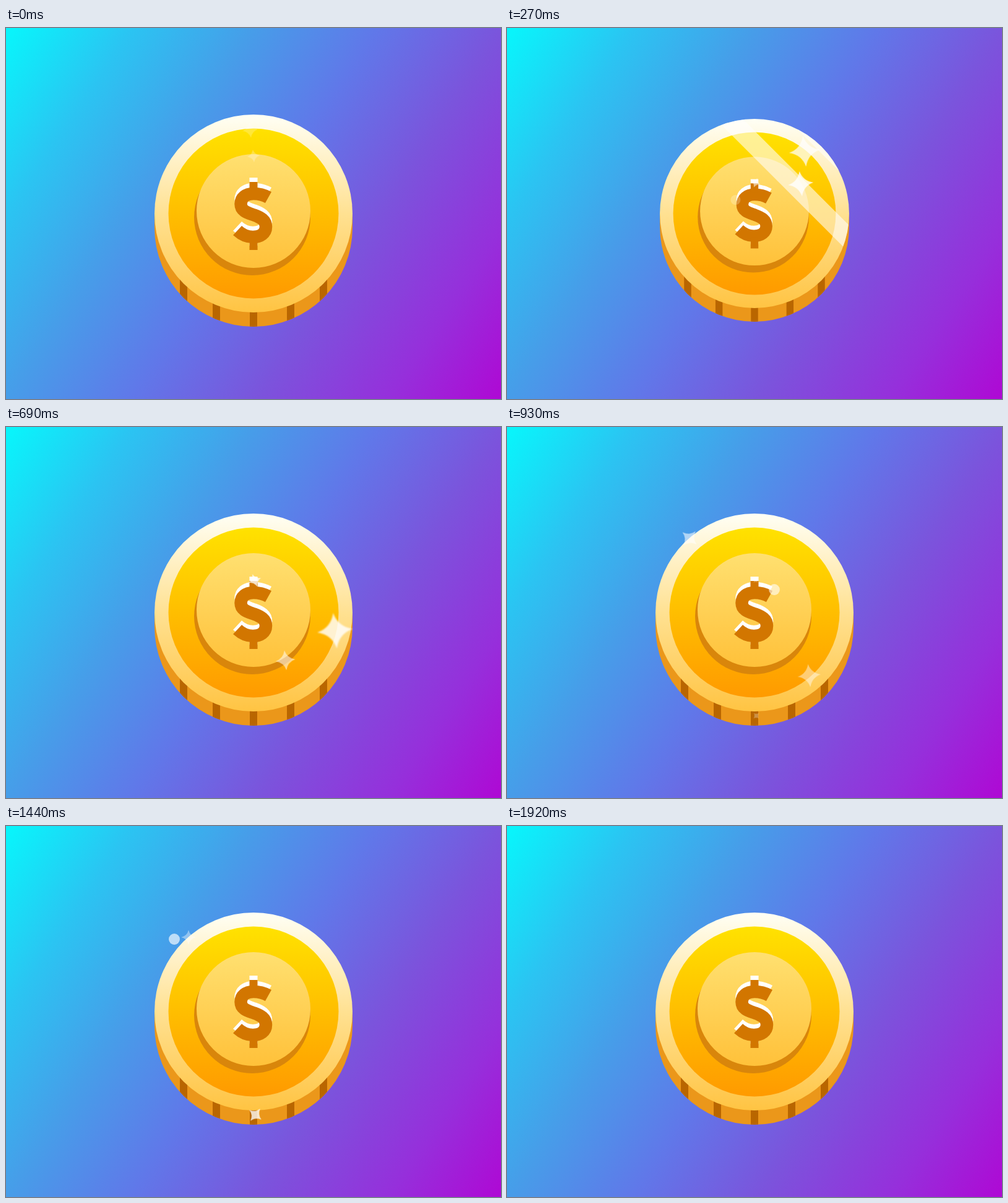
These frames come from a looping animation (800 px wide and 600 px high, 1950 ms). An HTML page:

```html
<!DOCTYPE html>
<html lang="en">
<head>
<meta charset="utf-8">
<title>Shining coin</title>
<style>
  html, body { margin: 0; width: 100%; height: 100%; overflow: hidden; }
  svg { display: block; width: 100vw; height: 100vh; }
</style>
</head>
<body>
<svg viewBox="0 0 800 600" preserveAspectRatio="none">
  <defs>
    <linearGradient id="sky" gradientUnits="userSpaceOnUse" x1="0" y1="0" x2="831" y2="554">
      <stop offset="0.01" stop-color="#09f4fb"/>
      <stop offset="0.17" stop-color="#2bc4f2"/>
      <stop offset="0.33" stop-color="#469ee9"/>
      <stop offset="0.5" stop-color="#6078e9"/>
      <stop offset="0.67" stop-color="#7b54dc"/>
      <stop offset="0.85" stop-color="#962fdb"/>
      <stop offset="1" stop-color="#af08d4"/>
    </linearGradient>
    <linearGradient id="rim" x2="0" y2="1">
      <stop offset="0" stop-color="#fffff5"/>
      <stop offset="0.5" stop-color="#ffe192"/>
      <stop offset="1" stop-color="#ffc443"/>
    </linearGradient>
    <linearGradient id="ring" x2="0" y2="1">
      <stop offset="0" stop-color="#ffe200"/>
      <stop offset="1" stop-color="#ff9a00"/>
    </linearGradient>
    <linearGradient id="disc" x2="0" y2="1">
      <stop offset="0" stop-color="#ffe070"/>
      <stop offset="1" stop-color="#ffc13a"/>
    </linearGradient>
    <clipPath id="face"><circle r="160"/></clipPath>
    <clipPath id="edge"><path d="M-160 0V23A160 160 0 0 0 160 23V0Z"/></clipPath>
    <filter id="soft" x="-20%" y="-20%" width="140%" height="140%">
      <feGaussianBlur stdDeviation="0.03"/>
    </filter>
    <path id="star" d="M0-1Q.2-.2 1 0Q.2 .2 0 1Q-.2 .2-1 0Q-.2-.2 0-1Z" fill="#fff"/>
    <g id="dollar" fill="none">
      <path stroke-width="20.5" d="M24-26C16-30.500 8-32 0-32C-13-32-20.500-25-20.500-15.500C-20.500-3.500-9-1 1 2.500C12 6.500 20 11 20 21.500C20 32 11 38-1 38C-11 38-19 34-26 27.500"/>
      <path stroke-width="13" d="M0-51V-36M0 40V59"/>
    </g>
  </defs>
  <rect width="800" height="600" fill="url(#sky)"/>
  <g id="coin">
    <g clip-path="url(#edge)">
      <rect x="-160" width="320" height="184" fill="#eb971a"/>
      <path d="M-113 90V190M-60 90V190M0 90V190M60 90V190M113 90V190" stroke="#b96600" stroke-width="12"/>
    </g>
    <circle r="160" fill="url(#rim)"/>
    <circle r="137.500" fill="url(#ring)"/>
    <circle cx="-2" cy="6" r="94" fill="#d9860b"/>
    <circle cy="-4" r="92" fill="url(#disc)"/>
    <use href="#dollar" y="-7" stroke="#fff"/>
    <use href="#dollar" stroke="#d27600"/>
    <g clip-path="url(#face)">
      <g id="shine" fill="#fff" fill-opacity="0.58">
        <path d="M-300-300H-254L346 300H300Z"/>
        <path d="M-179-300H-139L461 300H421Z"/>
      </g>
    </g>
    <g id="sparks"></g>
  </g>
</svg>
<script>
const LOOP = 1950, STEP = 30;
const byId = id => document.getElementById(id);
const clamp = v => Math.max(0, Math.min(1, v));

function addSpark(tag, attrs) {
  const el = document.createElementNS("http://www.w3.org/2000/svg", tag);
  for (const name in attrs) el.setAttribute(name, attrs[name]);
  return byId("sparks").appendChild(el);
}

// Damped wobble that settles after 660 ms
function pulse(t) {
  const fade = (1 + Math.cos(Math.PI * clamp(t / 660))) / 2;
  return 1 + 0.071 * fade * Math.sin(2 * Math.PI * t / 380);
}

// The shine rushes in and slows down as it leaves
const sweep = t => 94 + 181 * Math.log(Math.max(t, 1) / 270);

// Clockwise path around the coin, speed in degrees per ms
const orbit = (radius, speed, delay) => t => {
  const angle = speed * (t - delay) * Math.PI / 180;
  return { x: radius * Math.sin(angle), y: -radius * Math.cos(angle), turn: -6 };
};

// Spinning on the spot, standing straight at one moment
const twinkle = (x, y, spin, upright) => t => ({ x, y, turn: spin * (upright - t) });

const stars = [
  { born: -100, life: 1240, size: 31, pose: orbit(135, 0.152, 15) },
  { born: -100, life: 1000, size: 23, pose: orbit(93, 0.212, 0) },
  { born: 60, life: 960, size: 12, pose: twinkle(2, -52, 0.1, 480) },
  { born: 750, life: 810, size: 21, pose: twinkle(-105, -120, 0.08, 1440) },
  { born: 840, life: 900, size: 14, pose: twinkle(3, 167, 0.19, 1170) },
];
for (const star of stars) star.el = addSpark("use", { href: "#star", filter: "url(#soft)" });

// Round flashes: place and time of full brightness
const flashes = [[-32, -23, 140], [-128.5, 122.5, 470], [32, -37, 860], [-128, -117, 1380]]
  .map(([x, y, peak]) => ({ peak, el: addSpark("circle", { cx: x, cy: y, fill: "#fff" }) }));

function draw(t) {
  byId("coin").setAttribute("transform", `translate(400 300) scale(${pulse(t)})`);
  byId("shine").setAttribute("transform", `translate(${sweep(t)} 0)`);

  for (const { el, born, life, size, pose } of stars) {
    const glow = Math.sin(Math.PI * clamp((t - born) / life));
    const { x, y, turn } = pose(t);
    el.setAttribute("transform",
      `translate(${x} ${y}) rotate(${turn}) scale(${size * (0.2 + 0.8 * glow)})`);
    el.setAttribute("opacity", 0.9 * glow);
  }

  for (const { el, peak } of flashes) {
    const age = t - peak;
    const glow = clamp(age < 0 ? 1 + age / 90 : 1 - age / 170);
    el.setAttribute("opacity", glow);
    el.setAttribute("r", 8 + 1.5 * glow);
  }
}

const start = performance.now();
function tick() {
  const t = (performance.now() - start) % LOOP;
  draw(Math.floor(t / STEP) * STEP);
  requestAnimationFrame(tick);
}
tick();
</script>
</body>
</html>
```
